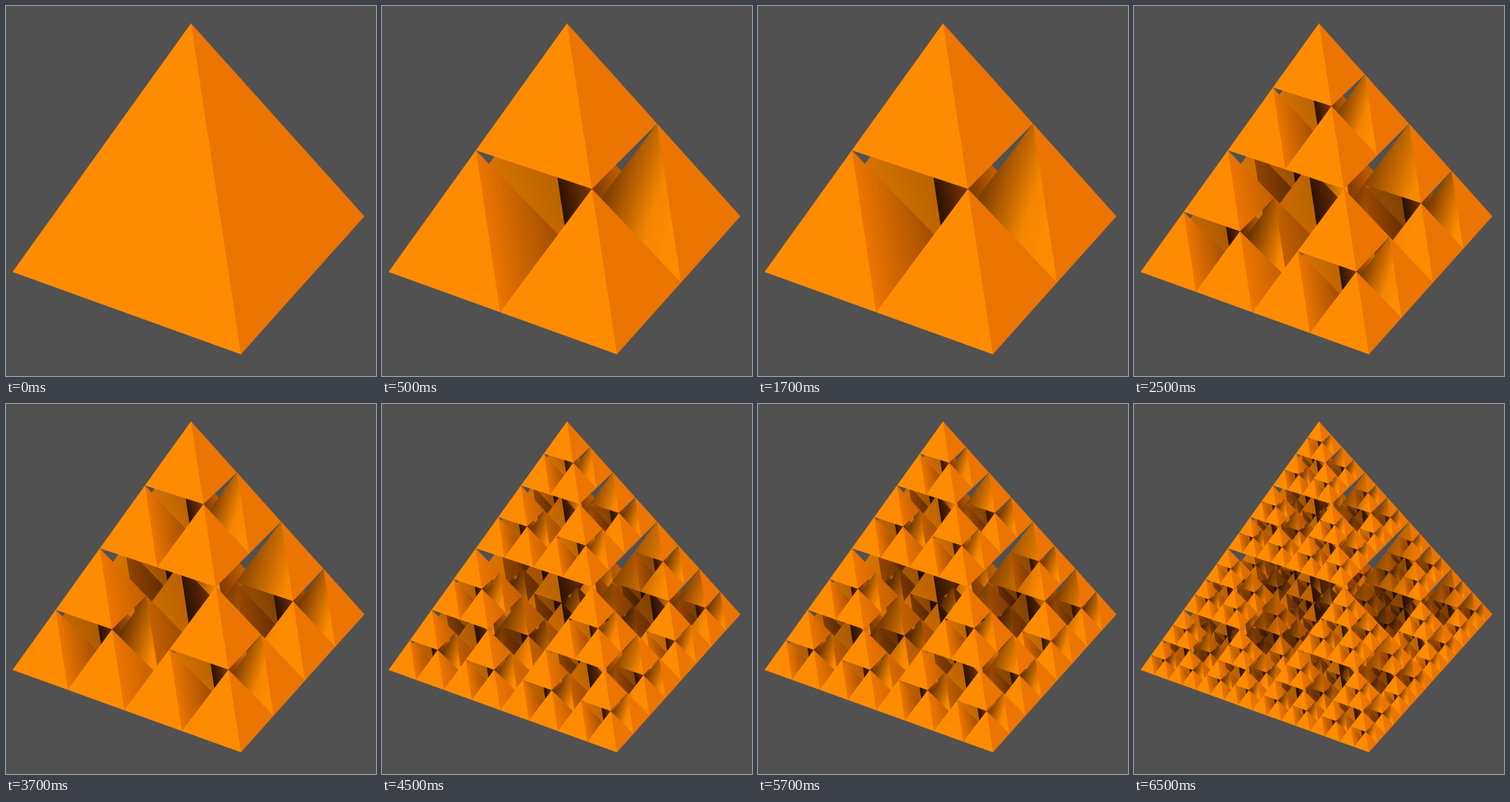
Write an HTML page with a canvas that moves like this. It is 512 px wide and 512 px high and loops after 8 s.

```html
<!DOCTYPE html>
<html lang="en">
<head>
<meta charset="utf-8">
<title>Sierpinski pyramid</title>
<style>
html, body { margin: 0; width: 100%; height: 100%; overflow: hidden; background: #525151; }
canvas { display: block; width: 100vw; height: 100vh; }
</style>
</head>
<body>
<canvas id="stage" width="512" height="512"></canvas>
<script>
const SIZE = 512, LOOP = 8000, HOLD = 2000, LEAD = 1500, LEVELS = 5, STOPS = 5;
const BACK = '#525151', FRONT = [255, 140], RIGHT = [235, 117];
const ctx = document.getElementById('stage').getContext('2d');

// Homogeneous screen points: midpoints of these keep the perspective.
const point = (x, y, w) => [x * w, y * w, w];
const T = point(256, 24, 1), A = point(9, 368, 1.045),
      B = point(325, 482, 1), C = point(496, 291, 1.08);
const D = A.map((a, i) => a + C[i] - B[i]);
const SOLID = [T, A, B, C, D];

// Faces as vertex indices, and the light left on faces that look into a gap.
// Values above 1 are fully lit before the vertex is reached.
const FACES = { front: [0, 1, 2], right: [0, 2, 3] };
const INNER = {
  front: { 3: [0.75, 0.3, 1.4], 4: [0.7, 0.92, 0.75] },
  right: { 1: [1, 1, 0.65], 4: [0.3, 0.15, 0.9] }
};
const BACK_TO_FRONT = [4, 1, 3, 2, 0];

const mid = (p, q) => p.map((v, i) => (v + q[i]) / 2);
const median = a => [...a].sort((p, q) => p - q)[1];
const flat = p => [p[0] / p[2], p[1] / p[2]];

function childLight(face, k, light) {
  const own = light[face], inner = INNER[face][k];
  if (!inner) {
    const corner = own[FACES[face].indexOf(k)];
    return own.map(v => (v + corner) / 2);
  }
  // A gap is as bright as the corner it opens at and the face it cuts.
  const a = light.front[1], c = light.right[2];
  const corner = k === 1 ? a : k === 3 ? c : (a + c) / 2;
  const level = Math.min(1, (corner + median(own)) / 2);
  return inner.map(v => v * level);
}

function tint([r, g], s) {
  s = Math.max(0.14, Math.min(1, s));
  return `rgb(${Math.round(r * s)},${Math.round(g * s ** 1.12)},0)`;
}

// A linear ramp that takes the three light values at the three corners.
function ramp(g, base, [p, q, r], [a, b, c]) {
  const ux = q[0] - p[0], uy = q[1] - p[1], vx = r[0] - p[0], vy = r[1] - p[1];
  const det = ux * vy - uy * vx;
  const gx = ((b - a) * vy - (c - a) * uy) / det;
  const gy = ((c - a) * ux - (b - a) * vx) / det;
  const len = gx * gx + gy * gy;
  if (len < 1e-10) return tint(base, a);
  const lo = Math.min(a, b, c), hi = Math.max(a, b, c);
  const at = s => [p[0] + gx * (s - a) / len, p[1] + gy * (s - a) / len];
  const fill = g.createLinearGradient(...at(lo), ...at(hi));
  for (let i = 0; i <= STOPS; i++) {
    fill.addColorStop(i / STOPS, tint(base, lo + (hi - lo) * i / STOPS));
  }
  return fill;
}

function polygon(g, pts, fill) {
  g.beginPath();
  pts.forEach(p => g.lineTo(p[0], p[1]));
  g.closePath();
  g.fillStyle = fill;
  g.fill();
}

function pyramid(g, verts, light, depth) {
  if (depth) {
    for (const k of BACK_TO_FRONT) {
      const front = childLight('front', k, light);
      const right = childLight('right', k, light);
      pyramid(g, verts.map(v => mid(v, verts[k])), { front, right }, depth - 1);
    }
    return;
  }
  const [t, a, b, c] = verts.map(flat);
  // The right face reaches under the front one so the ridge has no seam.
  const under = t.map((v, i) => (v + a[i] + b[i]) / 3);
  polygon(g, [t, under, b, c], ramp(g, RIGHT, [t, b, c], light.right));
  polygon(g, [t, a, b], ramp(g, FRONT, [t, a, b], light.front));
}

function render(depth) {
  const layer = document.createElement('canvas');
  layer.width = layer.height = SIZE;
  const g = layer.getContext('2d');
  g.fillStyle = BACK;
  g.fillRect(0, 0, SIZE, SIZE);
  pyramid(g, SOLID, { front: [1, 1, 1], right: [1, 1, 1] }, depth);
  return layer;
}

const layers = Array.from({ length: LEVELS }, (_, i) => render(i));
const start = performance.now();

function frame() {
  const t = (performance.now() - start) % LOOP;
  ctx.drawImage(layers[Math.floor((t + LEAD) / HOLD)], 0, 0);
  requestAnimationFrame(frame);
}
frame();
</script>
</body>
</html>
```
